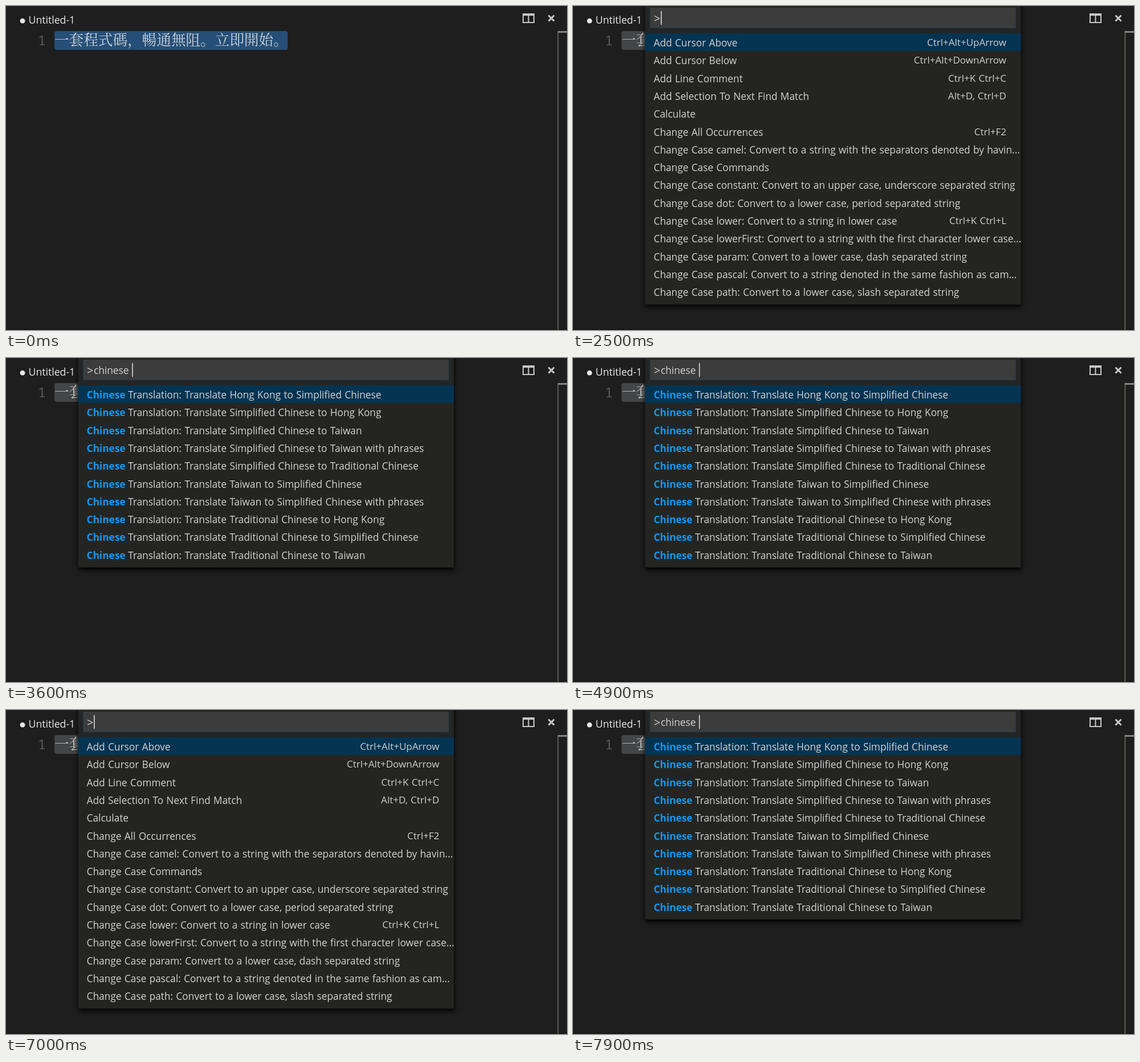
Recreate the animation shown at these times as an HTML page with a canvas. Size 984x569 px, loop 8000 ms.

```html
<!DOCTYPE html>
<html lang="zh">
<head>
<meta charset="utf-8">
<title>Command palette</title>
<style>
html, body { margin: 0; width: 100%; height: 100%; overflow: hidden; background: #1e1e1e; }
canvas { display: block; }
</style>
</head>
<body>
<canvas id="stage" width="984" height="569"></canvas>
<script>
const ctx = document.getElementById('stage').getContext('2d');
const LOOP = 8000;
const UI = '"Open Sans", "Noto Sans", sans-serif';
const CJK = '"Noto Serif CJK SC", "Noto Sans CJK SC", "Noto Sans CJK", serif';
const MONO = '"Noto Sans Mono", "DejaVu Sans Mono", monospace';
const ROW = 31.3, LIST_TOP = 47.8, MAX_ROWS = 15;

const TRADITIONAL = '一套程式碼，暢通無阻。立即開始。';
const SIMPLIFIED = '一套程式码，畅通无阻。立即开始。';

// Commands in alphabetical order, with an optional key binding.
const change = (name, effect, keys) => [`Change Case ${name}: Convert to a ${effect}`, keys];
const chinese = pair => [`Chinese Translation: Translate ${pair}`];
const commands = [
  ['Add Cursor Above', 'Ctrl+Alt+UpArrow'],
  ['Add Cursor Below', 'Ctrl+Alt+DownArrow'],
  ['Add Line Comment', 'Ctrl+K Ctrl+C'],
  ['Add Selection To Next Find Match', 'Alt+D, Ctrl+D'],
  ['Calculate'],
  ['Change All Occurrences', 'Ctrl+F2'],
  change('camel', 'string with the separators denoted by havin...'),
  ['Change Case Commands'],
  ['Change Case constant: Convert to an upper case, underscore separated string'],
  change('dot', 'lower case, period separated string'),
  change('lower', 'string in lower case', 'Ctrl+K Ctrl+L'),
  change('lowerFirst', 'string with the first character lower case...'),
  change('param', 'lower case, dash separated string'),
  change('pascal', 'string denoted in the same fashion as cam...'),
  change('path', 'lower case, slash separated string'),
  change('sentence', 'lower case, space separated string'),
  change('snake', 'lower case, underscore separated string'),
  change('swap', 'string with every character case reversed'),
  change('title', 'space separated string with the first...'),
  change('upper', 'string in upper case', 'Ctrl+K Ctrl+U'),
  ...[
    'Hong Kong to Simplified Chinese',
    'Simplified Chinese to Hong Kong',
    'Simplified Chinese to Taiwan',
    'Simplified Chinese to Taiwan with phrases',
    'Simplified Chinese to Traditional Chinese',
    'Taiwan to Simplified Chinese',
    'Taiwan to Simplified Chinese with phrases',
    'Traditional Chinese to Hong Kong',
    'Traditional Chinese to Simplified Chinese',
    'Traditional Chinese to Taiwan'
  ].map(chinese)
];

// [time, value] steps; a null query means the palette is closed.
const queries = [
  [0, null], [2500, ''], [3000, 'c'], [3100, 'ch'], [3200, 'chi'], [3300, 'chin'],
  [3400, 'chines'], [3500, 'chinese '], [5100, null],
  [7000, ''], [7200, 'c'], [7300, 'ch'], [7400, 'chi'], [7500, 'chin'],
  [7600, 'chines'], [7700, 'chinese ']
];
const editorCaret = [
  [0, false], [700, true], [1200, false], [1700, true], [2200, false],
  [5100, true], [5600, false], [6100, true], [6700, false]
];
const at = (steps, t) => steps.filter(s => s[0] <= t).pop()[1];

function rect(x, y, w, h, color) {
  ctx.fillStyle = color;
  ctx.fillRect(x, y, w, h);
}

function text(str, x, y, font, color, align = 'left') {
  ctx.font = font;
  ctx.fillStyle = color;
  ctx.textAlign = align;
  ctx.fillText(str, x, y);
  return ctx.measureText(str).width;
}

// Matched ranges of a label: one run, or "ch" plus a later word start.
// Clipped labels only match as one run.
function hits(label, query) {
  const low = label.toLowerCase(), q = query.trim();
  if (!q) return [];
  const word = low.search(new RegExp('\\b' + q));
  const start = word >= 0 ? word : low.indexOf(q);
  if (start >= 0) return [[start, start + q.length]];
  const rest = q.slice(2), next = low.indexOf(' ' + rest) + 1;
  const split = low.startsWith('ch') && rest && next && !low.endsWith('...');
  return split ? [[0, 2], [next, next + rest.length]] : null;
}

function drawLabel(label, ranges, y) {
  let x = 141.5, pos = 0;
  const run = (end, bold) => {
    if (end > pos) {
      x += text(label.slice(pos, end), x, y, `${bold ? 700 : 400} 17.3px ${UI}`,
        bold ? '#1098f2' : '#d2d2d2');
    }
    pos = end;
  };
  for (const [from, to] of ranges) {
    run(from, false);
    run(to, true);
  }
  run(label.length, false);
}

function drawPalette(query, caret) {
  const rows = commands.filter(c => hits(c[0], query)).slice(0, MAX_ROWS);
  const prefix = rows.findIndex(c => c[0].toLowerCase().startsWith(query.trim()));
  const selected = Math.max(0, prefix);

  ctx.save();
  ctx.shadowColor = '#000';
  ctx.shadowBlur = 8;
  ctx.shadowOffsetY = 4;
  rect(126.5, -30, 659, LIST_TOP + ROW * rows.length + 37, '#242523');
  ctx.restore();

  rect(135, 3, 642, 36, '#1d3d52');
  rect(136, 3, 640, 35, '#3c3c3c');
  ctx.wordSpacing = '0.8px';
  text('>', 142, 28.5, `19.5px ${UI}`, '#d2d2d2');
  const typed = text(query, 154, 28, `17.3px ${UI}`, '#d2d2d2');
  if (caret) rect(Math.round(153.8 + typed), 9, 1.5, 24, '#e4e4e4');

  rect(126.5, LIST_TOP + ROW * selected, 659, ROW, '#053453');
  rows.forEach(([label, keys], i) => {
    const y = 71 + ROW * i;
    drawLabel(label, hits(label, query), y);
    if (keys) text(keys, 760, y - 1, `17.05px ${UI}`, '#cfcfcf', 'right');
  });
  ctx.wordSpacing = '0px';
}

function drawIcons() {
  const c = '#c8c8c8';
  rect(906, 13, 21, 4, c);
  for (const x of [906, 915.5, 925]) rect(x, 13, 2, 17, c);
  rect(906, 28, 21, 2, c);
  ctx.strokeStyle = c;
  ctx.lineWidth = 3;
  ctx.beginPath();
  ctx.moveTo(951.5, 16.5);
  ctx.lineTo(961.5, 26.5);
  ctx.moveTo(961.5, 16.5);
  ctx.lineTo(951.5, 26.5);
  ctx.stroke();
}

function drawEditor(content, focused, caret) {
  rect(0, 0, 984, 569, '#1e1e1e');
  rect(0, 567, 984, 2, '#191919');
  ctx.fillStyle = '#e8e8e8';
  ctx.beginPath();
  ctx.arc(29, 26.2, 4.4, 0, Math.PI * 2);
  ctx.fill();
  text('Untitled-1', 39.5, 31, `17.7px ${UI}`, '#e8e8e8');
  drawIcons();

  rect(967.5, 44, 1.6, 525, '#6a6a5c');
  rect(968, 44, 16, 3, '#858585');

  text('1', 63, 69, `23px ${MONO}`, '#5a5a5a', 'center');
  ctx.fillStyle = focused ? '#264f78' : '#444546';
  ctx.beginPath();
  ctx.roundRect(85, 44, 409, 33, 4);
  ctx.fill();
  text(content, 85, 69, `300 25.6px ${CJK}`, focused ? '#cdd4d8' : '#c4c4c4');
  if (caret) rect(494, 44, 3, 33, '#c4c6c6');
}

function frame() {
  const t = performance.now() % LOOP;
  const query = at(queries, t);
  const open = query !== null;
  const content = t < 5200 ? TRADITIONAL : SIMPLIFIED;
  drawEditor(content, !open, !open && at(editorCaret, t));
  if (open) drawPalette(query, t < 4000 || t >= 4500);
  requestAnimationFrame(frame);
}
frame();
</script>
</body>
</html>
```
